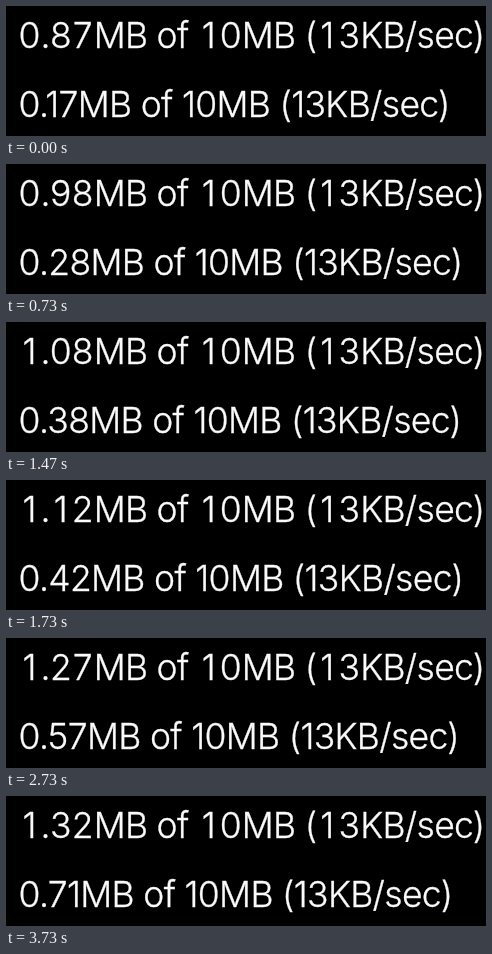
Write an HTML page that moves like this. It is 480 px wide and 130 px high and loops after 3990 ms.

```html
<!DOCTYPE html>
<html lang="en">
<head>
<meta charset="utf-8">
<title>Download progress</title>
<style>
html, body { margin: 0; width: 100%; height: 100%; overflow: hidden; background: #000; }
p {
  position: absolute; left: 12.6px; margin: 0; white-space: pre;
  font: 300 35.5px/43px Inter, sans-serif; letter-spacing: -.67px;
  color: #fafafa; -webkit-text-stroke: .35px #fafafa;
}
#fixed { top: 8px; }
#loose { top: 77px; }
/* Equal cells for the digits */
b { display: inline-block; width: 21.9px; text-align: center; font-weight: 300; letter-spacing: 0; }
</style>
</head>
<body>
<p id="fixed"></p>
<p id="loose"></p>
<script>
const LOOP = 3990, FPS = 15, FRAMES_PER_TICK = 3.75;
const fixed = document.getElementById('fixed');
const loose = document.getElementById('loose');
const start = performance.now();
let shown = -1;

const label = hundredths => `${(Math.round(hundredths) / 100).toFixed(2)}MB of 10MB (13KB/sec)`;

function draw() {
  const t = (performance.now() - start) % LOOP;
  const frame = Math.floor(t * FPS / 1000 + .06);
  const tick = Math.floor((frame + .75) / FRAMES_PER_TICK);
  if (tick !== shown) {
    shown = tick;
    // The upper download stalls near the end; the lower one wavers slightly
    fixed.innerHTML = label(Math.min(86.7 + 3.62 * tick, 132)).replace(/\d/g, '<b>$&</b>');
    loose.textContent = label(17 + 3.6 * tick + .2 * Math.sin(tick * Math.PI / 4));
  }
  requestAnimationFrame(draw);
}
draw();
</script>
</body>
</html>
```
